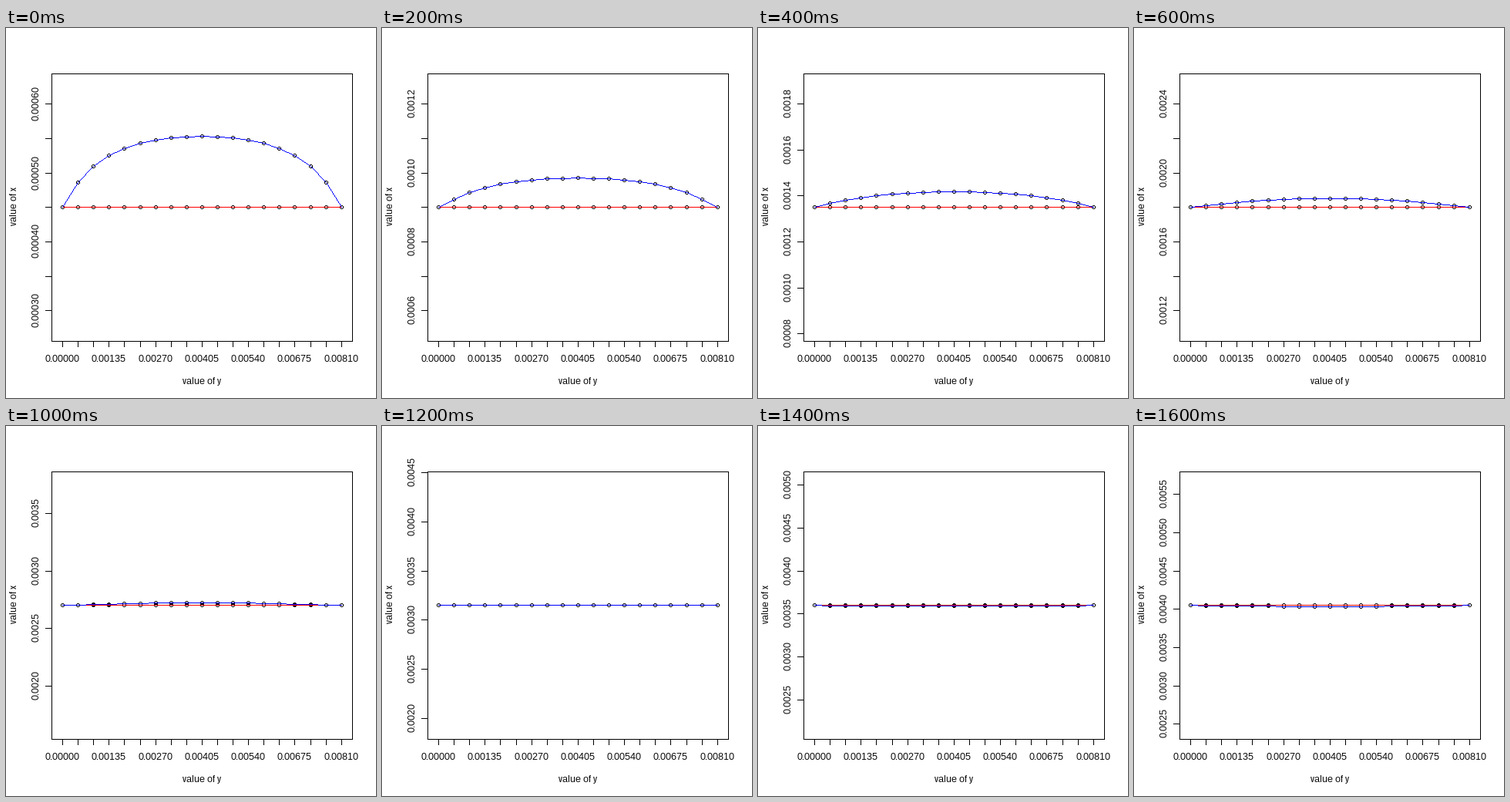
These frames come from a looping animation (480x480 px, 1800 ms). A matplotlib script:

```python
import itertools
import math

import matplotlib.pyplot as plt
import numpy as np
from matplotlib.animation import FuncAnimation

plt.rcParams.update({
    "font.family": "Liberation Sans",
    "font.size": 9,
    "text.hinting": "native",
    "text.hinting_factor": 1,
    "path.simplify": False,
    "path.snap": False,
})

SIZE, DPI = 480, 96
PX = 72 / DPI                        # one pixel in points

# Plot box and data scales, in pixels
LEFT, RIGHT, TOP, BOTTOM = 59, 449, 59, 406
MID = 232.8                          # height of the base value
SCALE = 402.2                        # pixels per relative unit of x
X0, DX, N = 73.51, 20.0988, 19       # first sample, spacing, count

# Per step: bulge height, weight of its parabola, power of the remainder
RISE = [91.9, 37.95, 20.2, 11.6, 6.4, 3.2, 0.7, -1.1, -1.42]
ROUND = [0.45, 0.55, 0.8] + [1] * 6
POWER = [5.2] + [4] * 8
TICK_STEP = [5, 10, 20, 20] + [50] * 5    # in units of 1e-5

# Five pixel circle: the rim of a square without its corners
RING = np.array([p for p in itertools.product(range(-2, 3), repeat=2)
                 if max(map(abs, p)) == 2 and min(map(abs, p)) < 2])

fig = plt.figure(figsize=(SIZE / DPI, SIZE / DPI), dpi=DPI, facecolor="white")
ax = fig.add_axes([0, 0, 1, 1])
ax.set_xlim(0, SIZE)
ax.set_ylim(SIZE, 0)
ax.axis("off")


def crisp(xs, ys, color, z, cap):
    line, = ax.plot(xs, ys, color=color, lw=PX, antialiased=False, zorder=z,
                    snap=False, solid_capstyle=cap, solid_joinstyle="miter")
    return line


def stroke(xs, ys, color="black", z=1):
    """Horizontal and vertical lines through pixel centres."""
    return crisp(np.floor(xs) + 0.5, np.floor(ys) + 0.5, color, z,
                 "projecting")


def dots(xs, ys, color="black", z=1):
    """Single pixels, each drawn as a short dash."""
    px = (xs[:, None] + [0.25, 0.75, np.nan]).ravel()
    return crisp(px, np.repeat(ys + 0.5, 3), color, z, "butt")


def rings(xs, ys):
    px = np.floor(xs)[:, None] + RING[:, 0]
    py = np.floor(ys)[:, None] + RING[:, 1]
    return dots(px.ravel(), py.ravel())


def trace(xs, ys, color, z):
    """Polyline stepped pixel by pixel."""
    points = np.floor(np.column_stack([xs, ys]))
    parts = []
    for a, b in zip(points, points[1:]):
        steps = int(np.abs(b - a).max())
        parts.append(np.floor(np.linspace(a, b, steps + 1) + 0.5))
    pixels = np.vstack(parts)
    return dots(pixels[:, 0], pixels[:, 1], color, z)


def label(x, y, text, angle=0):
    return ax.text(x, y, text, ha="center", va="baseline", rotation=angle,
                   rotation_mode="anchor", color="black")


def side_label(x, y, text):
    # Rotated text lands one pixel low and left, so nudge it back
    return label(x + 1, math.floor(y) - 1, text, 90)


sample_x = X0 + DX * np.arange(N)
u = np.abs(np.linspace(-1, 1, N))
flat = np.full(N, MID)

stroke([LEFT, RIGHT, RIGHT, LEFT, LEFT], [TOP, TOP, BOTTOM, BOTTOM, TOP])
for i, x in enumerate(sample_x):
    stroke([x, x], [BOTTOM, BOTTOM + 7])
    if i % 3 == 0:
        label(math.floor(x), 433, f"{i * 0.00045:.5f}")
label(254, 462, "value of y")
side_label(13, MID, "value of x")
rings(sample_x, flat)
stroke(sample_x, flat, "#ff0000", 2)

moving = []


def y_axis(k):
    base, step = 45 * (k + 1), TICK_STEP[k]
    digits = 5 if k == 0 else 4
    first = math.ceil(base * 0.568 / step)
    last = math.floor(base * 1.432 / step)
    skip = 2 if SCALE * step / base < 48 else 1
    for n in range(first, last + 1):
        y = MID - SCALE * (n * step / base - 1)
        moving.append(stroke([LEFT - 8, LEFT], [y, y]))
        if (n - first) % skip == 0:
            moving.append(side_label(42, y, f"{n * step * 1e-5:.{digits}f}"))


def draw(k):
    while moving:
        moving.pop().remove()
    y_axis(k)
    a = ROUND[k]
    curve = MID - RISE[k] * (1 - a * u**2 - (1 - a) * u**POWER[k])
    moving.append(rings(sample_x, curve))
    moving.append(trace(sample_x, curve, "#0000ff", 3))
    return moving


anim = FuncAnimation(fig, draw, frames=9, interval=200, repeat=True,
                     repeat_delay=0, init_func=lambda: draw(0))
plt.show()
```
